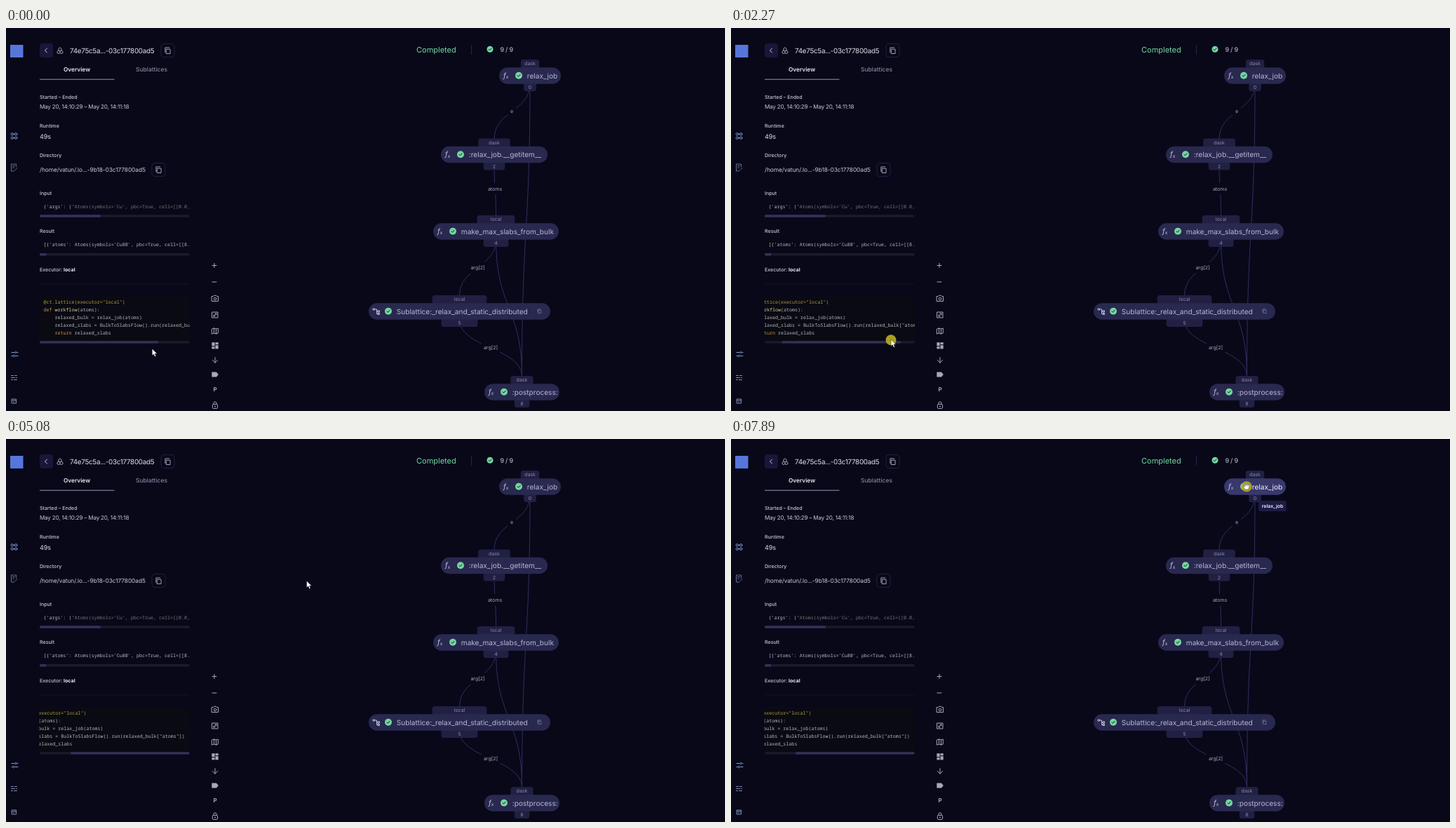
An HTML page for the animation above (8 s loop, 1025 by 546 pixels).

```html
<!DOCTYPE html>
<html lang="en">
<head>
<meta charset="utf-8">
<title>Workflow overview</title>
<style>
  html, body { margin: 0; width: 100%; height: 100%; overflow: hidden; background: #080819; }
  svg { display: block; width: 100vw; height: 100vh; }
  text { font-family: Inter, "Open Sans", sans-serif; text-rendering: geometricPrecision; white-space: pre; }
  .mono { font-family: "Noto Sans Mono", "DejaVu Sans Mono", monospace; font-size: 6.69px; fill: #b6b6c0; }
  .mid { text-anchor: middle; }
  .line { fill: none; stroke-width: 1; stroke-linecap: round; stroke-linejoin: round; }
</style>
</head>
<body>
<svg id="stage" viewBox="0 0 1025 546" preserveAspectRatio="none"></svg>
<script>
const LOOP = 8000;
const BG = '#080819', GREEN = '#74d6a0', EDGE = '#302e60';
const PILL = '#29284f', PILL_HOVER = '#39386c', TAB = '#212043';
const TRACK = '#1a1a2b', THUMB = '#33315a';

const text = (x, y, size, fill, body, extra = '') =>
  `<text x="${x}" y="${y}" font-size="${size}" fill="${fill}" ${extra}>${body}</text>`;
const rect = (x, y, w, h, fill, r = 0, extra = '') =>
  `<rect x="${x}" y="${y}" width="${w}" height="${h}" rx="${r}" fill="${fill}" ${extra}/>`;
const line = (d, color, extra = '') => `<path class="line" d="${d}" stroke="${color}" ${extra}/>`;
const at = (x, y, body) => `<g transform="translate(${x} ${y})">${body}</g>`;
const span = (fill, body) => `<tspan fill="${fill}">${body}</tspan>`;
const code = (x, y, body) => `<text class="mono" x="${x}" y="${y}">${body}</text>`;

const check = (x, y, r) => at(x, y,
  `<circle r="${r}" fill="${GREEN}"/>` + line('M-2 .1L-.6 1.6 2.1-1.4', '#141433', 'stroke-width="1.1"'));

const copyIcon = (x, y, s, color) => at(x, y, `<g transform="scale(${s})">` +
  line('M-2-2H4V5H-2ZM-4 3V-4.5H2.5', color) + '</g>');

const copyButton = (x, y) =>
  rect(x - 9.5, y - 9.5, 19, 19, 'none', 4, 'stroke="#201f42"') + copyIcon(x, y, .9, '#b0b0c4');

function sidebar() {
  const blue = '#7f9fd4', grey = '#8490b4';
  let out = rect(6, 24, 18.5, 18, '#5676dc');
  const rings = [[-2.7, -2.7], [2.7, -2.7], [-2.7, 2.7], [2.7, 2.7]]
    .map(([x, y]) => `<circle class="line" cx="${x}" cy="${y}" r="1.7" stroke="${blue}"/>`).join('');
  out += at(11.5, 154, rings + line('M-1-2.7H1M-1 2.7H1', blue));
  out += at(11.5, 199, line('M3-1V-5H-4V5H0M-2-2.5H1M-2 0H0M1 4L4.5.5', '#66708f'));
  out += at(12.5, 465, line('M-4.5-2.5H0M3-2.5H4.5M-4.5 2.5H-3M0 2.5H4.5M1.5-4V-1M-1.5 1V4', blue));
  out += at(11.5, 498.5, line('M-4-3H-1M1-3H4M-4 0H1M3 0H4M-4 3H-2M0 3H4', grey));
  out += at(11.5, 532, line('M-3-3H3V3H-3ZM-3-1H3M-1 1H0', grey));
  return out;
}

function panel() {
  const soft = '#c9c9d8', bright = '#dedee9';
  const heading = (y, body) => text(48, y, 7.1, soft, body, 'font-weight="500"');
  const bar = (y, w) => rect(48, y, 213.5, 3.4, TRACK, 1.5) + rect(48, y, w, 3.4, THUMB, 1.5);
  return rect(48, 22, 19, 20, '#181739', 4) + line('M58.5 29L55.5 32 58.5 35', soft) +
    at(77, 32, line('M0-4L2-2.5V0L0 1-2 0V-2.5ZM-2 0L-4 1.5V3.5L-2 4.5 0 3.5V1M2 0L4 1.5V3.5L2 4.5 0 3.5', '#a5a5bb', 'stroke-width=".8"')) +
    text(91, 35.5, 9.9, bright, '74e75c5a...-03c177800ad5', 'letter-spacing="-.3"') +
    copyButton(230.5, 32) +
    text(101, 62, 8.3, '#e8e8f2', 'Overview', 'class="mid" font-weight="600"') +
    text(207.5, 62, 8.5, '#8585a0', 'Sublattices', 'class="mid" font-weight="500"') +
    rect(48, 72.7, 106.5, 1, '#9393b0') +
    heading(101, 'Started – Ended') +
    text(48, 115.2, 8.1, soft, 'May 20, 14:10:29 – May 20, 14:11:18', 'letter-spacing="-.2"') +
    heading(142, 'Runtime') + text(48, 157.8, 9.1, bright, '49s', 'letter-spacing="-.1"') +
    heading(184.3, 'Directory') +
    text(48, 204.8, 8.4, soft, '/home/vatun/.lo...-9b18-03c177800ad5', 'letter-spacing="-.1"') +
    copyButton(217.5, 202) +
    heading(237.7, 'Input') +
    heading(292, 'Result') +
    heading(346.5, 'Executor: <tspan font-weight="700" fill="#ececf4">local</tspan>') +
    `<g clip-path="url(#codeBox)">` +
    code(53.5, 256.8, `{'args': (` + span('#77756a', `"Atoms(symbols='Cu', pbc=True, cell=[[0.0,`)) +
    code(53.5, 311.4, `[{'atoms': Atoms(symbols='Cu80', pbc=True, cell=[[8.`) + '</g>' +
    bar(266.3, 87) + bar(321, 9.5) + rect(48, 364.5, 213.5, 1, '#13132a');
}

function listing() {
  const olive = '#aea03c', orange = '#c4933f';
  const lines = [
    span(olive, '@ct.lattice(executor="local")'),
    span(orange, 'def ') + span('#d8cf9a', 'workflow') + '(atoms):',
    '    relaxed_bulk = relax_job(atoms)',
    '    relaxed_slabs = BulkToSlabsFlow().run(relaxed_bulk["atoms"])',
    '    ' + span(orange, 'return') + ' relaxed_slabs'
  ];
  return rect(48, 383, 213.5, 63, '#0a0a13') +
    `<g clip-path="url(#codeBox)"><g id="listing">` +
    lines.map((body, i) => code(53.5, 393.1 + i * 10.9, body)).join('') + '</g></g>' +
    rect(48, 446.2, 213.5, 3.4, TRACK, 1.5) + rect(48, 446.2, 169.5, 3.4, THUMB, 1.5, 'id="thumb"');
}

function toolbar() {
  const c = '#a8a8ba';
  const icons = [
    [338.5, line('M-3 0H3M0-3V3', c)],
    [362, line('M-3 0H3', c)],
    [385.5, line('M-4.5-3H-2.5L-1.5-4.2H1.5L2.5-3H4.5V4H-4.5Z', c) + `<circle class="line" r="1.8" cy=".5" stroke="${c}"/>`],
    [409, line('M-4-4H4V4H-4ZM0-2H2V0M0 2H-2V0M2-2L-2 2', c)],
    [432, line('M-4.3-3L-1.5-4 1.5-3 4.3-4V3L1.5 4-1.5 3-4.3 4ZM-1.5-4V3M1.5-3V4', c)],
    [452.8, rect(-4.6, -4.6, 4.2, 5, c) + rect(.5, -4.6, 4.2, 3, c) + rect(-4.6, 1.4, 4.2, 3.2, c) + rect(.5, -.6, 4.2, 5.2, c)],
    [473.5, line('M0-3.8V3.6M-3.6 0L0 3.8 3.6 0', c, 'stroke-width="1.2"')],
    [494, `<path d="M-4.6-3.4H2L4.8 0 2 3.4H-4.6Z" fill="${c}"/>`],
    [515.5, text(0, 2.9, 8, c, 'P', 'class="mid" font-weight="700"')],
    [538, rect(-3.6, -1.6, 7.2, 6, 'none', 1, `stroke="${c}"`) + line('M-2-1.6V-3.2A2 2 0 0 1 2-3.2V-1.6', c) + `<circle r=".9" cy="1.4" fill="${c}"/>`]
  ];
  return icons.map(([y, body], i) => at(i < 2 ? 297 : 298, y, body)).join('');
}

function node(x, y, w, label, place, num, id = '') {
  const cx = x + w / 2, top = w * .15, low = w * .1;
  const nested = label.startsWith('Sub');
  const glyph = nested
    ? at(x + 10.5, y, line('M-4-4H-2V-2H-4ZM-3-2M-2-3H1V3.5H3M1 0H3M3-1.2H5V1H3ZM3 2.5H5V4.5H3Z', '#c3c3dc', 'stroke-width=".9"'))
    : text(x + 6, y + 2.6, 10, '#c9c9de', '<tspan font-style="italic">f</tspan><tspan font-size="6.5" dy="1.4">x</tspan>');
  return `<path d="M${cx - top} ${y - 11}v-8.5q0-3.5 3.5-3.5h${2 * top - 7}q3.5 0 3.5 3.5v8.5z" fill="${TAB}"/>` +
    `<path d="M${cx - low} ${y + 11}v7.5q0 3.5 3.5 3.5h${2 * low - 7}q3.5 0 3.5-3.5v-7.5z" fill="${TAB}"/>` +
    text(cx, y - 15, 7, '#8a89ab', place, 'class="mid"') +
    text(cx, y + 19.3, 7, '#8a89ab', num, 'class="mid"') +
    rect(x, y - 11.8, w, 23.6, PILL, 11.8, id && `id="${id}"`) + glyph + check(x + 28, y - .3, 5) +
    text(x + 39.8, y + 3.5, 10.1, '#b8b7d6', label, id && `id="${id}Label"`) +
    (nested ? copyIcon(x + 243.5, y - .5, .6, '#8f8eb0') : '');
}

function graph() {
  // Links run from the bottom of one pill to the top of the next node's tab.
  const link = (x1, cy1, x2, cy2) => {
    const y1 = cy1 + 12, y2 = cy2 - 23, m = (y1 + y2) / 2;
    return line(`M${x1} ${y1}C${x1} ${m} ${x2} ${m} ${x2} ${y2}`, EDGE);
  };
  const tag = (x, y, w, body) => rect(x - w / 2, y - 8, w, 16, BG) +
    text(x, y + 2.4, 7, '#a9a9c0', body, 'class="mid"');
  return link(747, 68, 696, 180.5) + link(747, 68, 735.5, 519) + link(696, 180.5, 698.5, 290) +
    link(698.5, 290, 646.5, 404) + link(698.5, 290, 735.5, 519) + link(646.5, 404, 735.5, 519) +
    tag(721, 118.8, 12, 'e') + tag(697, 229.3, 28, 'atoms') +
    tag(672.5, 341.5, 27, 'arg[2]') + tag(691, 455.7, 27, 'arg[2]') +
    node(703, 68, 88, 'relax_job', 'dask', 0, 'first') +
    node(620, 180.5, 152, ':relax_job.__getitem__', 'dask', 2) +
    node(609, 290, 179, 'make_max_slabs_from_bulk', 'local', 4) +
    node(517, 404, 259, 'Sublattice:_relax_and_static_distributed', 'local', 5) +
    node(682, 519, 107, ':postprocess:', 'dask', 8);
}

const status = () => text(585, 34.5, 11, GREEN, 'Completed') + rect(663, 24, 1, 14, '#24244a') +
  check(690, 30.3, 4.5) + text(704.5, 33.8, 9, '#c9c9d8', '9 / 9', 'letter-spacing="-.25"');

const overlay = () =>
  `<g id="tooltip">${rect(752, 88, 39.7, 15, '#1d1b46', 3)}${text(772, 97.8, 6.9, '#f0f0f8', 'relax_job', 'class="mid" font-weight="600"')}</g>` +
  `<g id="pointer"><circle id="press" cy=".8" r="7.5" fill="#b9ae1e" opacity=".92"/>` +
  `<path id="arrow" d="M0 0V9.6L2.2 7.6 3.8 11.2 5.5 10.5 4 7H7Z" fill="#fff" stroke="#101018" stroke-width=".5"/>` +
  `<path id="hand" d="M-2.2 5L-5 1Q-5.2-.2-3.8.1L-2.6 1.2-3.5-3Q-3.2-4.2-2.3-3.4L-1.4-.5-1.3-4.4Q-.7-5.4 0-4.4L.3-.6 1.3-4Q2.2-4.7 2.6-3.6L2.1-.2 3.4-2.4Q4.5-2.8 4.5-1.6L3.2 3.4 2.2 5Z" fill="#fff" stroke="#33320f" stroke-width=".5"/></g>`;

const stage = document.getElementById('stage');
stage.innerHTML = '<clipPath id="codeBox"><rect x="47.5" y="245" width="214.2" height="200"/></clipPath>' +
  rect(0, 0, 1025, 546, BG) + sidebar() + panel() + listing() + toolbar() + graph() + status() + overlay();
const el = id => document.getElementById(id);

// Keys are [time, value, ...]; monotone cubic interpolation of one column.
function track(keys, col, t) {
  const last = keys.length - 1;
  if (t <= keys[0][0]) return keys[0][col];
  if (t >= keys[last][0]) return keys[last][col];
  const i = keys.findIndex(k => k[0] > t) - 1;
  const slope = j => j < 0 || j >= last ? 0 :
    (keys[j + 1][col] - keys[j][col]) / (keys[j + 1][0] - keys[j][0]);
  const tangent = j => {
    const a = slope(j - 1), b = slope(j);
    return a * b <= 0 ? 0 : 2 * a * b / (a + b);
  };
  const h = keys[i + 1][0] - keys[i][0], u = (t - keys[i][0]) / h, v = 1 - u;
  return keys[i][col] * (1 + 2 * u) * v * v + keys[i + 1][col] * u * u * (3 - 2 * u) +
    h * u * v * (v * tangent(i) - u * tangent(i + 1));
}

const pointerKeys = [
  [620, 208.3, 457.3], [1140, 200.5, 445.5], [1440, 200.5, 445.3], [1850, 207, 445],
  [2270, 228, 444], [2630, 242.3, 445.3], [2850, 250, 446], [3080, 231, 446],
  [4170, 231, 446], [4220, 254, 446.7], [4980, 386, 225], [5320, 529, 168],
  [5770, 529, 168], [6140, 617, 125.7], [6600, 705, 83], [7100, 735, 67]
];
const thumbKeys = [[1440, 0], [1850, 6.7], [2270, 24.3], [2630, 41], [2740, 44]];
const SCROLL_RATIO = 213.5 / 169.5;

function draw(t) {
  const show = (id, on) => el(id).setAttribute('visibility', on ? 'visible' : 'hidden');
  const offset = track(thumbKeys, 1, t);
  el('thumb').setAttribute('x', 48 + offset);
  el('listing').setAttribute('transform', `translate(${-offset * SCROLL_RATIO} 0)`);

  const hover = t >= 6700;
  el('pointer').setAttribute('transform', `translate(${track(pointerKeys, 1, t)} ${track(pointerKeys, 2, t)})`);
  show('press', (t >= 1140 && t < 2950) || t >= 7890);
  show('arrow', !hover);
  show('hand', hover);
  el('first').setAttribute('fill', hover ? PILL_HOVER : PILL);
  el('firstLabel').setAttribute('fill', hover ? '#f2f2fa' : '#b8b7d6');
  el('tooltip').setAttribute('opacity', Math.min(1, Math.max(0, (t - 6850) / 250)));
}

const start = performance.now();
function tick() {
  draw((performance.now() - start) % LOOP);
  requestAnimationFrame(tick);
}
tick();
</script>
</body>
</html>
```
